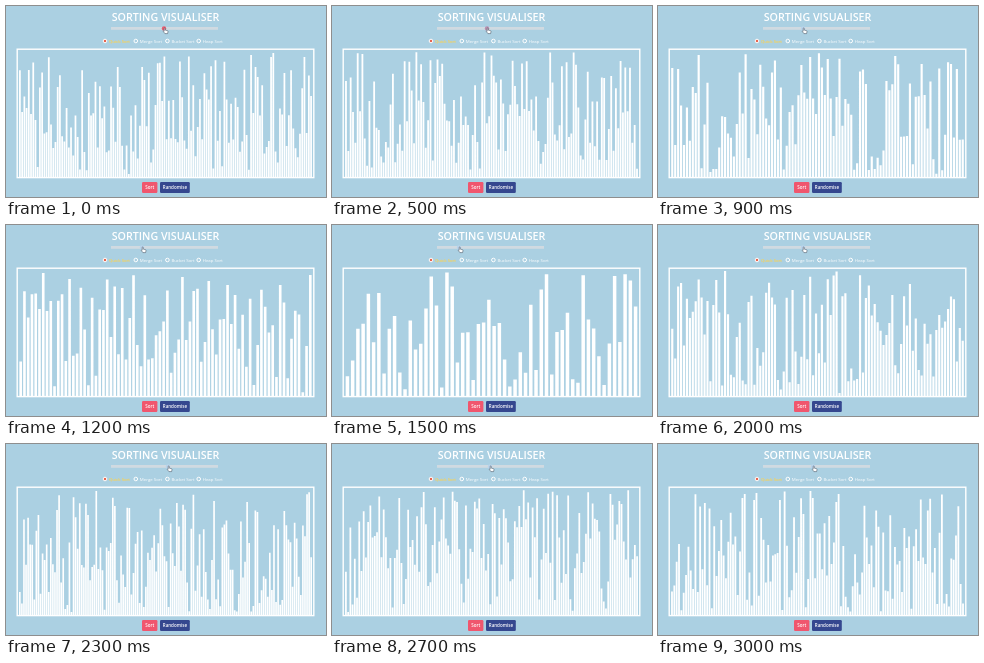
Recreate the animation shown at these times as an HTML page. Size 320 px wide and 191 px high, loop 3100 ms.

```html
<!DOCTYPE html>
<html lang="en">
<head>
<meta charset="utf-8">
<title>Sorting Visualiser</title>
<style>
  html, body { margin: 0; width: 100%; height: 100%; overflow: hidden; background: #abd0e2; }
  svg { display: block; width: 100%; height: 100%; }
  text { font-family: "Open Sans", "Noto Sans", sans-serif; fill: #fff; }
  .title { font-size: 10.7px; font-weight: 600; text-anchor: middle; }
  .option { font-size: 4.35px; }
  .option.on { font-size: 4.2px; font-weight: 600; fill: #ffd24a; }
  .button { font-size: 4.5px; font-weight: 600; text-anchor: middle; }
</style>
</head>
<body>
<svg viewBox="0 0 320 191">
  <rect width="320" height="191" fill="#abd0e2"/>
  <text class="title" x="159.5" y="15">SORTING VISUALISER</text>
  <rect x="105" y="21" width="107" height="2.8" fill="#d0dae1"/>
  <g id="slider">
    <circle id="thumb" cy="22.4" r="2.2"/>
    <path d="M.2 22.2q.6-.5 1 .1v1.8l2.3.6q.6.2.5.9l-.4 2h-2.7l-1.6-2.2q.1-.7.9-.2z"
      fill="#fff" stroke="#3c4654" stroke-width=".5"/>
  </g>
  <g id="options"></g>
  <rect x="11.2" y="43.2" width="296.6" height="128.4" fill="none" stroke="#fff" stroke-width="1.4"/>
  <path id="bars" fill="#fff"/>
  <rect x="136" y="176" width="15.4" height="11" rx="1.2" fill="#f0566e"/>
  <text class="button" x="143.7" y="183.2">Sort</text>
  <rect x="154" y="176" width="29.8" height="11" rx="1.2" fill="#35478f"/>
  <text class="button" x="168.9" y="183.2">Randomise</text>
</svg>
<script>
const LOOP = 3100, STEP = 100;
const LEFT = 12.8, WIDTH = 293.4, BASE = 171, MAX = 125;
const TRACK = 105, BARS_PER_PX = 2.45;
const $ = id => document.getElementById(id);

// Slider position over time: [step, x]
const drag = [[0, 158], [5, 155], [9, 145], [15, 127], [20, 145], [23, 162], [30, 155]];

function random(seed) {
  return () => {
    seed = (seed + 0x6D2B79F5) | 0;
    let t = Math.imul(seed ^ (seed >>> 15), 1 | seed);
    t = (t + Math.imul(t ^ (t >>> 7), 61 | t)) ^ t;
    return ((t ^ (t >>> 14)) >>> 0) / 4294967296;
  };
}

function sliderX(step) {
  const i = Math.max(1, drag.findIndex(p => p[0] >= step));
  const [a, x] = drag[i - 1], [b, y] = drag[i];
  return x + (y - x) * (step - a) / (b - a);
}

// Each slider move makes a fresh array that fills the box
function barPath(step, x) {
  const next = random(step * 977 + 41);
  const count = Math.round(2 + BARS_PER_PX * (x - TRACK));
  const pitch = WIDTH / count, w = pitch * 0.58 + 0.45;
  let d = "";
  for (let i = 0; i < count; i++) {
    const at = LEFT + i * pitch + (pitch - w) / 2;
    const h = 3 + (MAX - 3) * next();
    d += `M${at.toFixed(2)} ${BASE}v${-h.toFixed(1)}h${w.toFixed(2)}V${BASE}z`;
  }
  return d;
}

const labels = [["Quick Sort", 99], ["Merge Sort", 129.8], ["Bucket Sort", 161.4], ["Heap Sort", 192.7]];
$("options").innerHTML = labels.map(([name, x], i) =>
  `<circle cx="${x}" cy="35" r="1.8" fill="${i ? "#abd0e2" : "#e8654f"}" stroke="#fff" stroke-width="1"/>
   <text class="option${i ? "" : " on"}" x="${x + 4}" y="36.6">${name}</text>`).join("");

let shown = -1;
function draw(ms) {
  const step = Math.floor(ms % LOOP / STEP);
  if (step === shown) return;
  shown = step;
  const x = sliderX(step);
  $("slider").setAttribute("transform", `translate(${x.toFixed(2)} 0)`);
  $("thumb").setAttribute("fill", step < 5 ? "#e45c70" : step < 7 ? "#b78fae" : "#b9d3ea");
  $("bars").setAttribute("d", barPath(step, x));
}

const start = performance.now();
function tick() {
  draw(performance.now() - start);
  requestAnimationFrame(tick);
}
tick();
</script>
</body>
</html>
```
